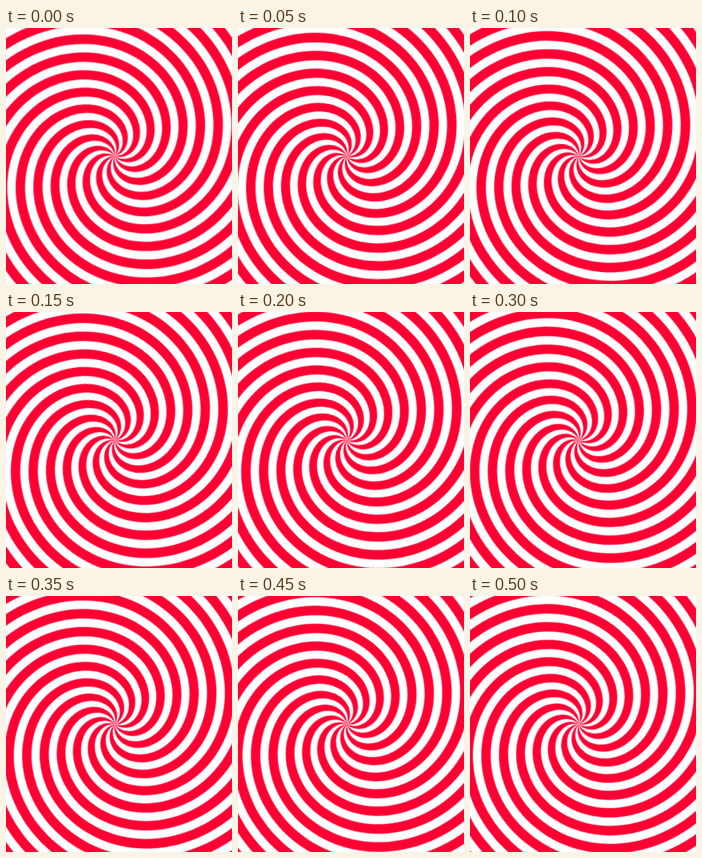
These frames come from a looping animation (283x320 px, 550 ms). An HTML page:

```html
<!DOCTYPE html>
<html lang="en">
<head>
<meta charset="utf-8">
<title>Spiral</title>
<style>
  html, body { margin: 0; width: 100%; height: 100%; overflow: hidden; background: #fff; }
  svg { display: block; width: 283px; height: 320px; }
  #arms {
    fill: #ff0033;
    transform-origin: 0 0;
    /* the small lead keeps each step from showing late */
    animation: spin 550ms steps(11, end) -5ms infinite;
  }
  /* one arm spacing per loop */
  @keyframes spin { to { transform: rotate(calc(360deg / 11)); } }
</style>
</head>
<body>
<svg viewBox="0 0 283 320">
  <g transform="translate(136.3 160.3)"><path id="arms"/></g>
</svg>
<script>
  const ARMS = 11, PITCH = 23.4, REACH = 232, STEP = 2, PHASE = 0, WIDTH = 0.53;
  const TURN = 2 * Math.PI / ARMS;

  // Archimedean edge: the radius shrinks by PITCH for each arm spacing turned
  function edge(phase) {
    const pts = [];
    for (let r = 0; r <= REACH; r += STEP) {
      const a = TURN * (phase - r / PITCH);
      pts.push((r * Math.cos(a)).toFixed(2) + ' ' + (r * Math.sin(a)).toFixed(2));
    }
    return pts;
  }

  let d = '';
  for (let i = 0; i < ARMS; i++) {
    const inner = edge(PHASE + i), outer = edge(PHASE + i + WIDTH);
    d += 'M' + inner.concat(outer.reverse()).join('L') + 'Z';
  }
  document.getElementById('arms').setAttribute('d', d);
</script>
</body>
</html>
```
